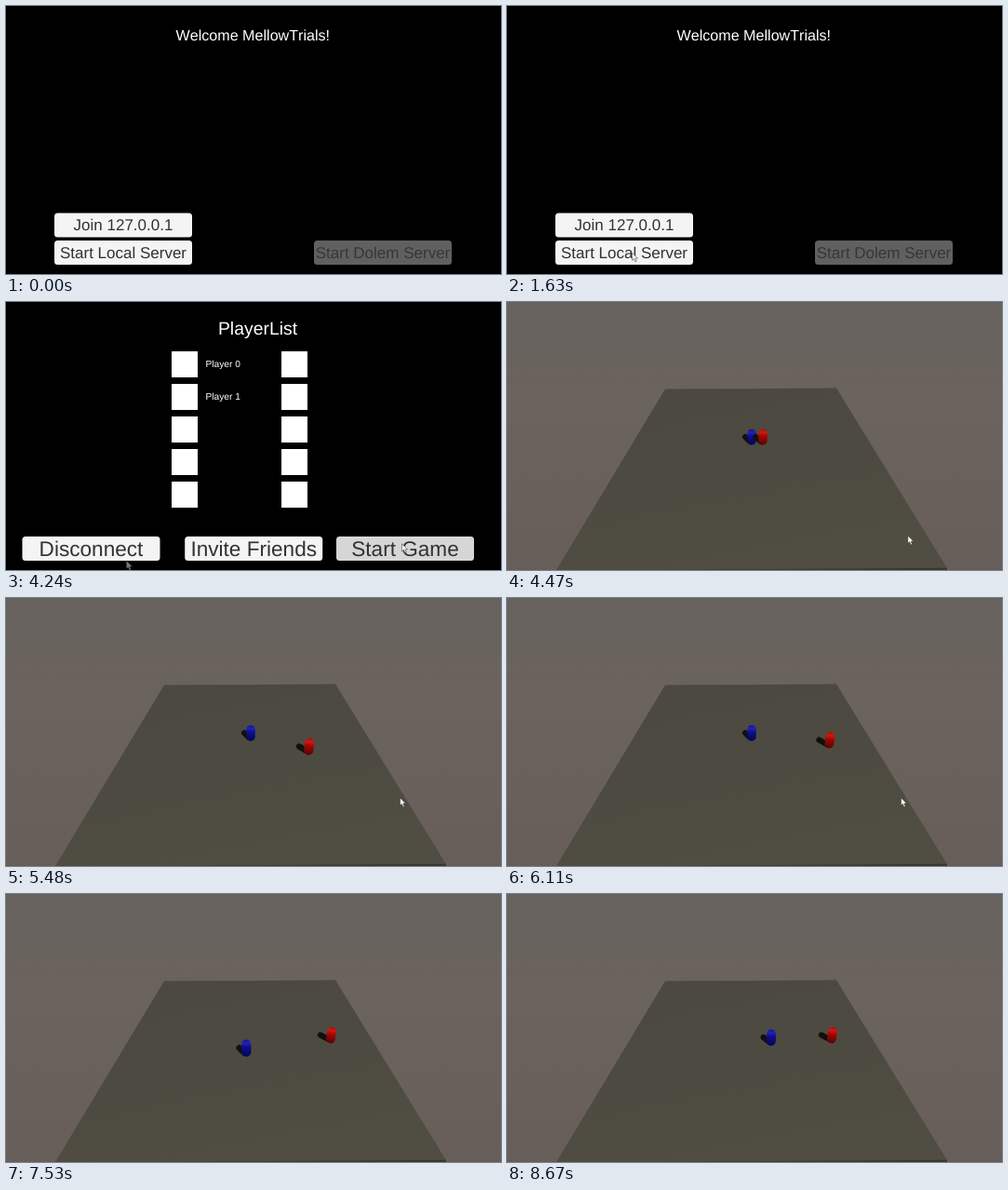
These frames come from a looping animation (532x288 px, 9090 ms). An HTML page:

```html
<!DOCTYPE html>
<html lang="en">
<head>
<meta charset="utf-8">
<title>Lobby and arena</title>
<style>
  html, body { margin: 0; width: 100%; height: 100%; overflow: hidden; background: #000; }
  svg { display: block; width: 532px; height: 288px; }
  text {
    font-family: "Liberation Sans", Arial, sans-serif; fill: #fff;
    font-kerning: none; text-rendering: geometricPrecision;
  }
  .button rect { fill: #f4f4f4; }
  .button text { fill: #323232; text-anchor: middle; }
  .off rect { fill: #606060; }
  .off text { fill: #373737; }
  .title { text-anchor: middle; }
</style>
</head>
<body>
<svg viewBox="0 0 532 288">
  <defs>
    <linearGradient id="sky" x2="0" y2="1">
      <stop offset="0" stop-color="#66625e"/>
      <stop offset=".36" stop-color="#6b635d"/>
      <stop offset="1" stop-color="#675e59"/>
    </linearGradient>
    <linearGradient id="floor" x1=".2" x2=".6" y2="1">
      <stop offset="0" stop-color="#4a4840"/>
      <stop offset="1" stop-color="#504e42"/>
    </linearGradient>
    <linearGradient id="blue" x2="0" y2="1">
      <stop offset="0" stop-color="#12128c"/>
      <stop offset=".2" stop-color="#2222bc"/>
      <stop offset=".45" stop-color="#0e0e86"/>
      <stop offset="1" stop-color="#060650"/>
    </linearGradient>
    <linearGradient id="red" x2="0" y2="1">
      <stop offset="0" stop-color="#a80c06"/>
      <stop offset=".2" stop-color="#d41810"/>
      <stop offset=".45" stop-color="#9c0804"/>
      <stop offset="1" stop-color="#560402"/>
    </linearGradient>
    <path id="arrow" d="M.5 .8V9L2.4 7.3L3.7 10.5L5.2 9.9L3.9 6.8H6.5Z"/>
  </defs>

  <g id="menu"><text class="title" x="265.3" y="36.5" font-size="16.1">Welcome MellowTrials!</text></g>

  <g id="lobby">
    <text class="title" x="270.5" y="34.5" font-size="19.4">PlayerList</text>
    <g id="slots" fill="#fff"></g>
    <text x="214.5" y="69.5" font-size="10.2">Player 0</text>
    <text id="guest" x="214.5" y="104.5" font-size="10.2">Player 1</text>
  </g>

  <g id="arena">
    <rect width="532" height="288" fill="url(#sky)"/>
    <path d="M170 93.6L354 92.6L473 286V288H53Z" fill="url(#floor)"/>
    <path d="M150 288L473 285.8V288Z" fill="#3a382f"/>
  </g>

  <use id="trace" href="#arrow" x="129" y="277.5" fill="#777"/>
  <use id="mouse" href="#arrow" fill="#fff" stroke="#222" stroke-width=".5"/>
</svg>
<script>
const LOOP = 9090;
const LIST_AT = 1920, GUEST_AT = 3000, ARENA_AT = 4370;
const $ = id => document.getElementById(id);

function add(parent, tag, attrs) {
  const el = document.createElementNS("http://www.w3.org/2000/svg", tag);
  for (const k in attrs) el.setAttribute(k, attrs[k]);
  return parent.appendChild(el);
}

function button(parent, x, y, label, size, off) {
  const g = add(parent, "g", { class: off ? "button off" : "button" });
  const face = add(g, "rect", { x, y, width: 148, height: 26, rx: 3.5 });
  add(g, "text", { x: x + 74, y: y + 13 + size * .35, "font-size": size }).textContent = label;
  return face;
}

button($("menu"), 52, 222.4, "Join 127.0.0.1", 17);
const hostFace = button($("menu"), 52, 252, "Start Local Server", 17);
button($("menu"), 331, 252, "Start Dolem Server", 17, true);
button($("lobby"), 17.5, 252, "Disconnect", 22.6);
button($("lobby"), 192.2, 252, "Invite Friends", 22.6);
const startFace = button($("lobby"), 355, 252, "Start Game", 22.6);

for (const x of [178, 296])
  for (let i = 0; i < 5; i++)
    add($("slots"), "rect", { x, y: 53 + 35 * i, width: 28, height: 28 });

function capsule(fill) {
  const g = add($("arena"), "g", {});
  const shadow = add(g, "path", { stroke: "#11100c", "stroke-width": 6, "stroke-linecap": "round" });
  const body = add(g, "rect", { x: -4.8, y: -8.3, width: 9.6, height: 17, rx: 4.8, fill: `url(#${fill})` });
  return ([x, y]) => {
    const reach = 7 + Math.max(0, x - 263) * .05;
    g.setAttribute("transform", `translate(${x} ${y}) scale(${1 + (y - 145) * .004})`);
    shadow.setAttribute("d", `M-2 5L${-reach} 0`);
    body.setAttribute("transform", `rotate(${(x - 265) * .1})`);
  };
}
const placeBlue = capsule("blue"), placeRed = capsule("red");

const linear = p => p;
const smooth = p => p * p * (3 - 2 * p);
const easeOut = p => 1 - (1 - p) ** 1.9;
const clamp = p => Math.min(1, Math.max(0, p));

// An eased line from one point to another, pushed sideways by a half sine.
function arc(t0, t1, from, to, bow = [0, 0], ease = smooth) {
  const at = t => {
    const p = ease(clamp((t - t0) / (t1 - t0)));
    return from.map((v, i) => v + (to[i] - v) * p + bow[i] * Math.sin(Math.PI * p));
  };
  return { t0, at };
}

const redRun = arc(4730, 6390, [275, 145], [349.5, 151.5], [0, 12], easeOut);
const blueTurn = arc(6860, 7740, [263, 145], [279, 165.5], [-25, 7], linear);
const blueDrift = arc(7740, 8670, [279, 165.5], [284, 154], [0, 0], easeOut);

const mouseRuns = [
  { ...arc(200, 600, [163, 270], [5, 280], [0, -8]), end: 800 },
  { ...arc(1330, 1660, [44, 279], [129, 264], [100, 0]), end: LIST_AT },
  { ...arc(3560, 3980, [512, 279], [425, 259], [0, -18]), end: ARENA_AT },
  { ...arc(ARENA_AT, 4950, [425, 259], [423, 214], [22, -20]), end: 6150 },
  { ...arc(6150, 6390, [423, 214], [174, 222]), end: 6390 }
];

function press(face, t, at) {
  const v = Math.round(244 - 30 * clamp((t - at) / 60));
  face.style.fill = `rgb(${v},${v},${v})`;
}

const show = (id, on) => { $(id).style.display = on ? "" : "none"; };

function draw(t) {
  show("menu", t < LIST_AT);
  show("lobby", t >= LIST_AT && t < ARENA_AT);
  show("guest", t >= GUEST_AT);
  show("arena", t >= ARENA_AT);
  show("trace", t >= 1950 && t < ARENA_AT);
  press(hostFace, t, 1860);
  press(startFace, t, 4180);
  placeRed(redRun.at(t));
  placeBlue((t < blueDrift.t0 ? blueTurn : blueDrift).at(t));

  const run = mouseRuns.find(r => t >= r.t0 && t < r.end);
  show("mouse", run);
  if (run) $("mouse").setAttribute("transform", `translate(${run.at(t)})`);
}

const start = performance.now();
function tick() {
  draw((performance.now() - start) % LOOP);
  requestAnimationFrame(tick);
}
tick();
</script>
</body>
</html>
```
